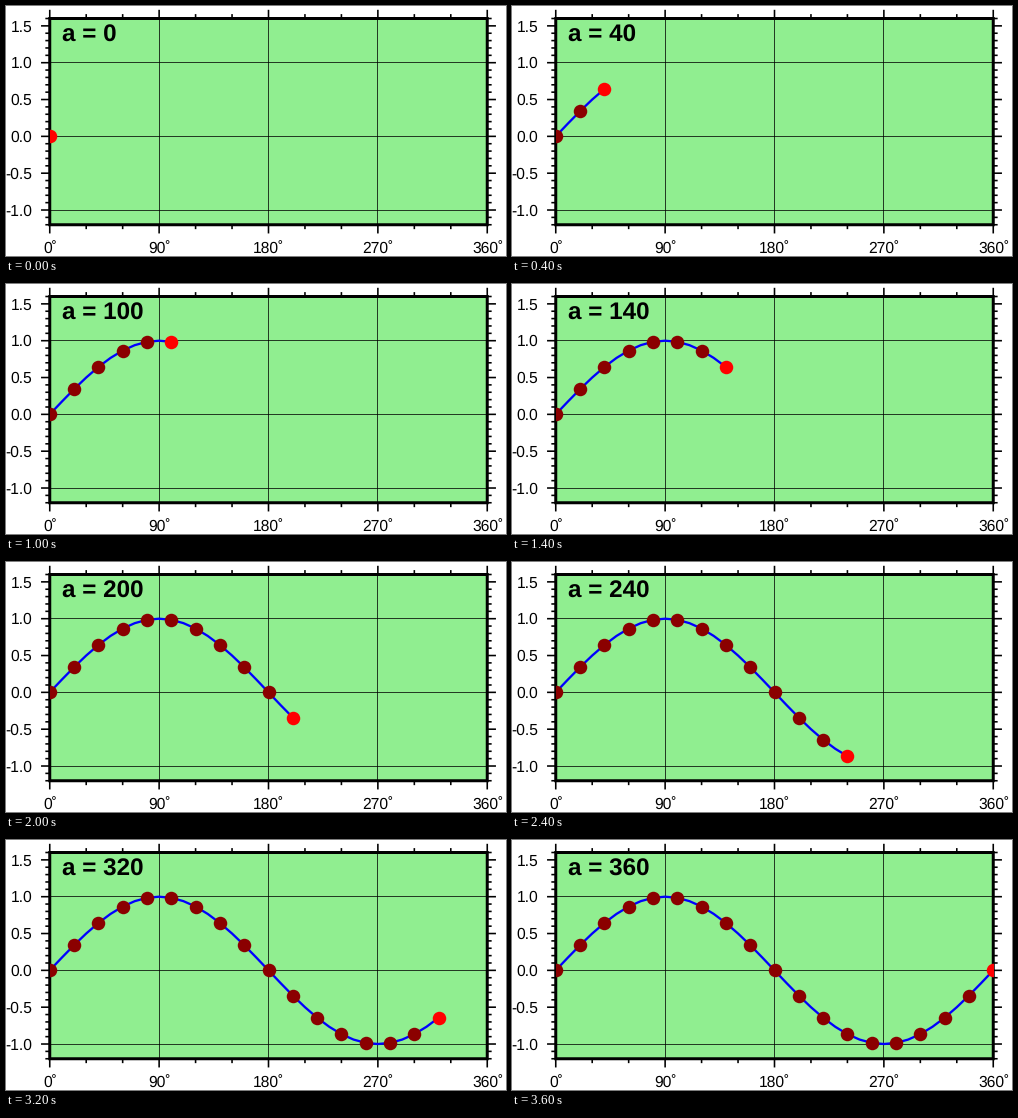
Animation, 500 px wide and 250 px high, one loop 3800 ms. Source, as a matplotlib script:

```python
import matplotlib.pyplot as plt
import numpy as np
from matplotlib.animation import FuncAnimation
from matplotlib.patches import Rectangle

plt.rcParams.update({"font.family": "Liberation Sans", "text.hinting": "none"})

# All coordinates are pixels, measured from the top left corner.
W, H, DPI = 500, 250, 125
PX = 72 / DPI  # points per pixel
LEFT, TOP, PW, PH = 43.75, 12.5, 437.5, 206.25
RIGHT, BOTTOM = LEFT + PW, TOP + PH
YMIN, YMAX = -1.2, 1.6
MAJOR, MINOR = 8.7, 4.4
STEP, FRAMES = 20, 19


def to_x(deg):
    return LEFT + np.asarray(deg) / 360 * PW


def to_y(val):
    return TOP + (YMAX - np.asarray(val)) / (YMAX - YMIN) * PH


def sine(deg):
    return to_x(deg), to_y(np.sin(np.radians(deg)))


def pixel(v):
    return np.floor(v) + 0.5


fig = plt.figure(figsize=(W / DPI, H / DPI), dpi=DPI, facecolor="white")
ax = fig.add_axes([0, 0, 1, 1])
ax.set(xlim=(0, W), ylim=(H, 0))
ax.axis("off")


def line(xs, ys, width):
    ax.plot(xs, ys, color="black", lw=width * PX, zorder=2, snap=False,
            solid_capstyle="butt")


def label(x, y, text, ha):
    ax.text(x, y, text, size=9, ha=ha, va="baseline")


def box(**style):
    ax.add_patch(Rectangle((LEFT, TOP), PW, PH, snap=False, **style))


box(fc="lightgreen", ec="none", zorder=0)
for deg in (90, 180, 270):
    line([pixel(to_x(deg))] * 2, [TOP, BOTTOM], 0.75)
for val in (-1, 0, 1):
    line([LEFT, RIGHT], [pixel(to_y(val))] * 2, 0.75)

for deg in range(0, 361, 30):
    x = to_x(deg)
    size = MINOR if deg % 90 else MAJOR
    line([x, x], [BOTTOM, BOTTOM + size], 1.6)
    line([x, x], [TOP - size, TOP], 1.6)
    if size == MAJOR:
        label(x + 0.4, BOTTOM + 28.8, f"{deg}\u02da", "center")

for k in range(-12, 17):
    y = to_y(k / 10)
    size = MINOR if k % 5 else MAJOR
    line([LEFT - size, LEFT], [y, y], 1.6)
    line([RIGHT, RIGHT + size], [y, y], 1.6)
    if size == MAJOR:
        label(LEFT - 17.6, y + 5.6, f"{k / 10:.1f}", "right")

box(fc="none", ec="black", lw=3 * PX, joinstyle="miter", zorder=4)

title = ax.text(LEFT + 12.5, TOP + 23.7, "", size=14, weight="bold",
                ha="left", va="baseline", zorder=8)
curve, = ax.plot([], [], color="blue", lw=2.3 * PX, zorder=5)
dot = dict(ls="none", marker="o", ms=13.5 * PX, mew=0, snap=False)
trail, = ax.plot([], [], color="darkred", zorder=6, **dot)
head, = ax.plot([], [], color="red", zorder=7, **dot)
clip = Rectangle((LEFT, TOP), PW, PH, transform=ax.transData)
for artist in (curve, trail, head):
    artist.set_clip_path(clip)


def update(i):
    a = i * STEP
    title.set_text(f"a = {a}")
    curve.set_data(*sine(np.arange(0, a + 1, 10)))
    trail.set_data(*sine(np.arange(0, a, STEP)))
    head.set_data(*sine(np.array([a])))
    return title, curve, trail, head


anim = FuncAnimation(fig, update, frames=FRAMES, interval=200, repeat=True)
plt.show()
```
